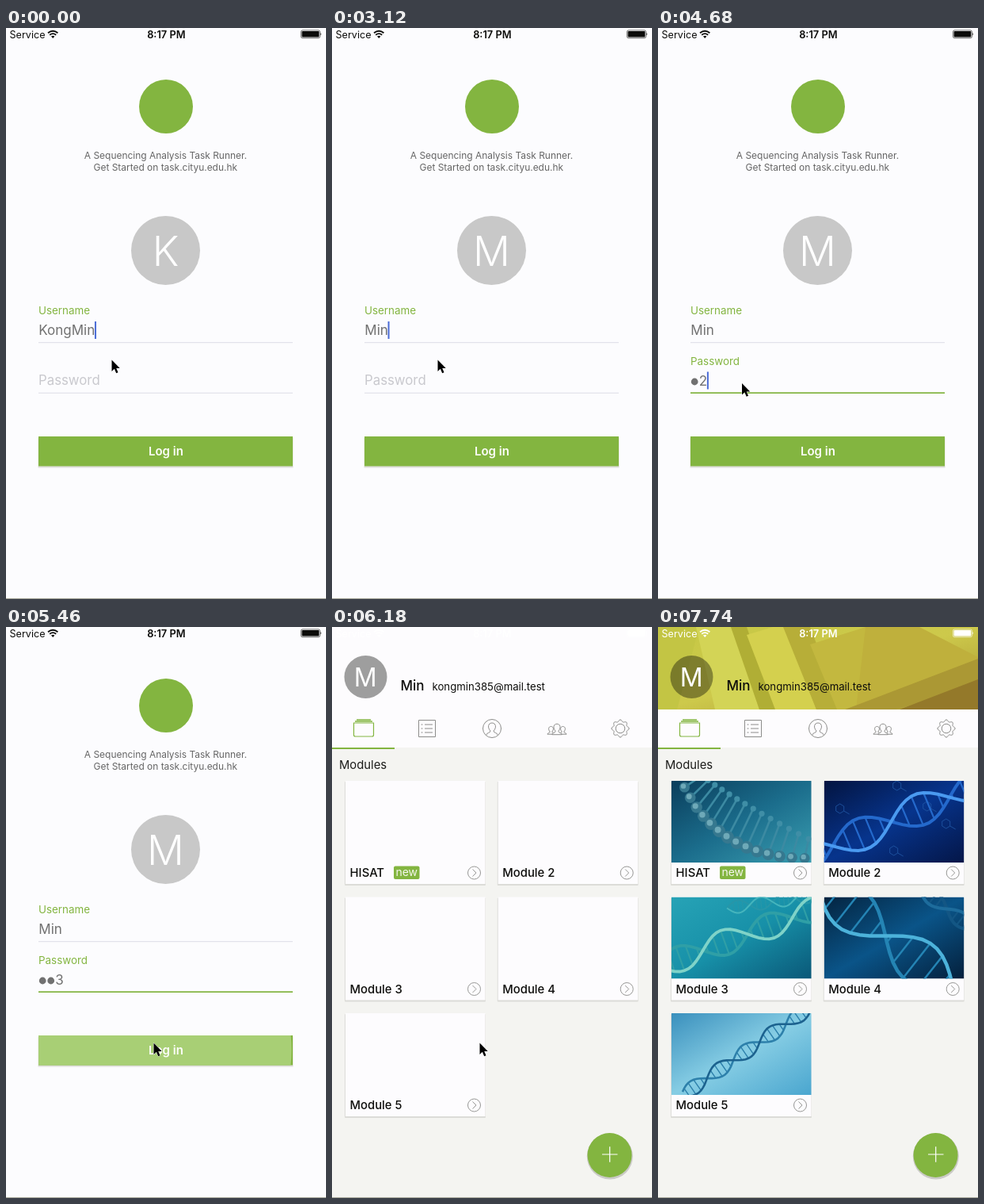
Write an HTML page that moves like this. It is 404 by 720 pixels and loops after 7.8 s.

```html
<!DOCTYPE html>
<html lang="en">
<head>
<meta charset="utf-8">
<title>Task runner login</title>
<style>
html, body { margin: 0; width: 100%; height: 100%; overflow: hidden; background: #fcfcfe; }
svg { display: block; }
#stage { width: 100%; height: 100%; }
text { font-family: Inter, Roboto, sans-serif; white-space: pre; }
</style>
</head>
<body>
<svg id="stage" viewBox="0 0 404 720"></svg>
<script>
const LOOP = 7800, STEP = 60;
const GREEN = [131, 181, 64], PALE = [201, 201, 206];
const rgb = c => `rgb(${c.map(Math.round)})`;
const clamp = v => Math.max(0, Math.min(1, v));
const span = (t, a, b) => clamp((t - a) / (b - a));
const ease = p => p * p * (3 - 2 * p);
const mix = (a, b, p) => a + (b - a) * p;
const mixColor = (a, b, p) => rgb(a.map((v, i) => mix(v, b[i], p)));
const green = rgb(GREEN), gray = '#8c8c8a', typed = '#717171';

// Markup helpers
const text = (x, y, font, fill, s, extra = '') =>
  `<text x="${x}" y="${y}" fill="${fill}" style="font:${font} Inter,Roboto,sans-serif" ${extra}>${s}</text>`;
const rect = (x, y, w, h, fill, extra = '') =>
  `<rect x="${x}" y="${y}" width="${w}" height="${h}" fill="${fill}" ${extra}/>`;
const disc = (x, y, r, fill, extra = '') =>
  `<circle cx="${x}" cy="${y}" r="${r}" fill="${fill}" ${extra}/>`;
const path = (d, color, width = 1, extra = '') =>
  `<path d="${d}" fill="none" stroke="${color}" stroke-width="${width}" ${extra}/>`;
const poly = (points, fill) => `<polygon points="${points}" fill="${fill}"/>`;
const mid = 'text-anchor="middle"';
const grad = (id, ...colors) =>
  `<linearGradient id="${id}" x1="0" y1="0" x2="1" y2="1">` +
  colors.map((c, i) => `<stop offset="${i / (colors.length - 1)}" stop-color="${c}"/>`).join('') +
  '</linearGradient>';

// Two twisted strands with rungs, along a straight axis
function helix(x1, y1, x2, y2, amp, turns, light, dark, width, shift = 0) {
  const len = Math.hypot(x2 - x1, y2 - y1), n = Math.round(turns * 20);
  const nx = -(y2 - y1) / len, ny = (x2 - x1) / len;
  const at = (i, side) => {
    const k = side * amp * Math.sin(i / 20 * Math.PI * 2 + shift), p = i / n;
    return `${(mix(x1, x2, p) + nx * k).toFixed(1)} ${(mix(y1, y2, p) + ny * k).toFixed(1)}`;
  };
  const a = [], b = [];
  let rungs = '';
  for (let i = 0; i <= n; i++) {
    a.push(at(i, 1));
    b.push(at(i, -1));
    if (i % 2) rungs += `M${at(i, 1)}L${at(i, -1)}`;
  }
  return path(rungs, dark, width * .55) + path('M' + b.join('L'), dark, width) +
    path('M' + a.join('L'), light, width);
}

// Beaded strands along two quadratic curves
function beads() {
  const q = (a, b, c, p) => a * (1 - p) ** 2 + 2 * b * p * (1 - p) + c * p * p;
  let rungs = '', balls = '';
  for (let i = 0; i <= 15; i++) {
    const p = i / 15, r = mix(6, 8, Math.sin(p * Math.PI));
    const x = q(10, 56, 185, p), y = q(-6, 104, 97, p);
    const u = q(30, 88, 186, p), v = q(-12, 30, 80, p);
    rungs += `M${x} ${y}L${u} ${v}`;
    balls += disc(u, v, 3.6, '#3f8ea6') + disc(x, y, r, '#36788f') + disc(x - 1.5, y - 1.5, r * .5, '#6ea9b8');
  }
  return path(rungs, '#3c8aa2', 2.6) + balls;
}

const hexagon = (x, y) => path(`M${x} ${y - 6}l5 3v6l-5 3l-5-3v-6zM${x + 5} ${y + 3}l7 4`, '#235aa8', .8);

const pictures = [
  beads(),
  [[92, 6], [130, 32], [20, 35], [154, 54], [88, 88]].map(p => hexagon(...p)).join('') +
    helix(-8, 90, 184, 10, 20, 1.3, '#4a9af0', '#2469cc', 4, -.8),
  helix(70, 14, 185, -2, 8, 2, '#45b5bd', '#2796a8', 2) +
    helix(-6, 84, 186, 14, 16, 1.7, '#7fd3c8', '#2f9fa6', 3.8, .6),
  helix(120, -12, 190, 42, 9, 1, '#1d6c9c', '#135684', 4) +
    helix(5, -8, 160, 114, 28, .9, '#4cb2da', '#2484b4', 4.5, .5),
  helix(16, 102, 182, -12, 9, 2.5, '#1c628f', '#2d80ab', 2.6, .4)
];

const cards = ['HISAT', 'Module 2', 'Module 3', 'Module 4', 'Module 5'];
function card(name, i) {
  const x = 17 + i % 2 * 192.7, y = 194 + Math.floor(i / 2) * 146.5;
  const badge = i ? '' : rect(x + 61, y + 107.5, 32.5, 16.5, green, 'rx="2"') +
    text(x + 77.2, y + 120, '14px', '#f6f8ee', 'new', mid);
  return rect(x - 1, y + 1, 178, 131, '#dcdcd8', 'rx="1"') +
    rect(x, y, 176.5, 130, '#fdfcfe') +
    `<svg class="photo" x="${x}" y="${y}" width="176.5" height="103" overflow="hidden">` +
    rect(0, 0, 177, 103, `url(#bg${i})`) + pictures[i] + '</svg>' +
    text(x + 5.6, y + 121, '500 14.8px', '#0d0d0b', name) + badge +
    disc(x + 162.5, y + 116, 8, 'none', `stroke="${gray}" stroke-width=".9"`) +
    path(`M${x + 160.5} ${y + 111.5}l4.5 4.5l-4.5 4.5`, gray, .9);
}

function gear(x, y) {
  let d = '';
  for (let i = 0; i < 64; i++) {
    const a = i / 32 * Math.PI, r = 9.9 + 1.2 * Math.cos(8 * a);
    d += `${i ? 'L' : 'M'}${(x + r * Math.cos(a)).toFixed(1)} ${(y + r * Math.sin(a)).toFixed(1)}`;
  }
  return path(d + 'Z', gray) + disc(x, y, 5.8, 'none', `stroke="${gray}"`);
}

const bust = (x, y, k) =>
  `M${x - 7 * k} ${y + 8 * k}c0-${3 * k} ${5 * k}-${2 * k} ${5 * k}-${5 * k}` +
  `c-${4 * k}-${4 * k}-${3 * k}-${10 * k} ${2 * k}-${10 * k}s${6 * k} ${6 * k} ${2 * k} ${10 * k}` +
  `c0 ${3 * k} ${5 * k} ${2 * k} ${5 * k} ${5 * k}`;

const icons =
  path('M27.5 121h25v15q0 2-2 2h-21q-2 0-2-2z', green, 1.2) +
  path('M29 119h22M31 117h18', green, 1.6) +
  path('M109.5 117.5h21v21h-21zM117 123h10M117 128h10M117 133h10M112.5 123h2M112.5 128h2M112.5 133h2', gray) +
  disc(202, 128, 11.5, 'none', `stroke="${gray}"`) + path(bust(202, 128, 1), gray) +
  path(bust(276.5, 130, .65) + 'z' + bust(291.5, 130, .65) + 'z', gray) +
  path(bust(284, 128.5, .9) + 'z', gray, 1, 'style="fill:#fdfcfe"') +
  gear(364, 128);

const banner = rect(0, 0, 404, 104, 'url(#gold)') +
  poly('0,0 52,0 24,104 0,104', '#c3c544') +
  poly('48,0 92,0 128,104 72,104', '#d3d456') +
  poly('92,0 112,0 148,104 128,104', '#b0ae35') +
  poly('112,10 158,-4 200,104 148,104', '#d4d04e') +
  poly('158,0 192,0 232,104 200,104', '#b7ae38') +
  poly('192,22 262,0 300,104 226,104', '#c3b83f') +
  poly('262,0 330,0 404,38 404,58 250,104', '#bfb03c') +
  poly('236,104 404,40 404,74 300,104', '#ab9834') +
  poly('305,104 404,66 404,104', '#94792a');

const field = (id, top) =>
  rect(41, top + 39.7, 321, 1, '#dcdce6') +
  `<g id="${id}Line">${rect(41, top + 39.3, 321, 1.7, green)}</g>` +
  text(41, 0, '13.4px', green, id === 'user' ? 'Username' : 'Password', `id="${id}Label"`) +
  text(41.3, top + 30.5, '17px', typed, '', `id="${id}Text"`);

const login =
  rect(0, 0, 404, 720, '#fcfcfe') +
  disc(202, 99, 34, green) +
  text(201.5, 165, '11.95px', '#666', 'A Sequencing Analysis Task Runner.', mid) +
  text(201.3, 179.5, '11.95px', '#666', 'Get Started on task.cityu.edu.hk', mid) +
  disc(201.5, 280.5, 43.5, '#c8c8c8') +
  text(201.5, 299.5, '300 52px', '#fff', '', `id="initial" ${mid}`) +
  field('user', 356.5) + field('pass', 420) +
  disc(46.2, 446, 4.4, typed, 'id="dot0"') + disc(56.7, 446, 4.4, typed, 'id="dot1"') +
  rect(0, 0, 2, 22, '#4a6bd6', 'id="caret"') +
  rect(40.5, 517, 322, 37.5, '#dededa') +
  `<svg x="41" y="515" width="321" height="37.5" overflow="hidden">` +
  rect(0, 0, 321, 38, green) + disc(145, 18, 0, '#a8cf75', 'id="ripple"') + '</svg>' +
  text(201.9, 539, '600 15px', '#fdfdfa', 'Log in', mid) +
  rect(0, 719, 404, 1, '#a9a99c');

const home =
  rect(0, 0, 404, 720, '#f4f4f1') + rect(0, 0, 404, 152, '#fdfcfe') +
  `<g id="banner">${banner}</g>` +
  disc(42.5, 63, 27, 'rgba(5,5,0,.38)') +
  text(42.3, 74.5, '32px', '#fff', 'M', mid) +
  text(86.5, 80, '500 17px', '#0d0d0b', 'Min') +
  text(126.5, 80, '13.2px', '#0d0d0b', 'kongmin385@mail.test') +
  icons + rect(0, 152, 79, 2, green) +
  text(9, 179, '14.8px', '#1c1c1a', 'Modules') +
  cards.map(card).join('') +
  disc(350.8, 667.5, 29, '#cacac6') + disc(350.5, 666, 28, green) +
  path('M341 665h19.5M350.7 655.3v19.5', '#fff', 1.2) +
  rect(0, 719, 404, 1, '#a9a99c');

const status = text(4.5, 12.5, '12.6px', 'inherit', 'Service', 'class="ink"') +
  text(202.3, 12.5, '600 12.8px', 'inherit', '8:17 PM', `class="ink" ${mid}`) +
  '<g fill="none" stroke="currentColor" stroke-width="1.8"><path d="M53 6.3q6.2-5.2 12.4 0M55.2 8.8q4-3.4 8 0"/></g>' +
  '<path d="M57 10.6q2.2-1.8 4.4 0l-2.2 2.4z" fill="currentColor"/>' +
  rect(372.4, 2.9, 24, 9.8, 'none', 'rx="2" stroke="currentColor" stroke-width=".6"') +
  rect(373.5, 4, 21.8, 7.6, 'currentColor', 'rx="1"') +
  '<path d="M397.4 6q1.6 1.8 0 3.6z" fill="currentColor"/>';

const stage = document.getElementById('stage');
stage.innerHTML = '<defs>' +
  grad('gold', '#c6c845', '#cdc94b', '#a5912f') +
  grad('bg0', '#0a3e5c', '#1b6d8c', '#3a9db0') +
  grad('bg1', '#031440', '#07348c', '#041648') +
  grad('bg2', '#27a3b6', '#1790a8', '#0a5878') +
  grad('bg3', '#042440', '#0a5488', '#04203c') +
  grad('bg4', '#3a90bd', '#86cde4', '#4aa6cf') + '</defs>' +
  `<g id="login">${login}</g><g id="home">${home}</g><g id="status">${status}</g>` +
  '<g id="mouse"><path d="M0 0v16l3.7-3.4l2.6 5.9l2.6-1.1l-2.5-5.8h5z" transform="scale(.9)" ' +
  'stroke="#fff" stroke-width="1" paint-order="stroke"/></g>';

const el = {};
stage.querySelectorAll('[id]').forEach(e => el[e.id] = e);
const photos = [...stage.querySelectorAll('.photo')];
const inks = stage.querySelectorAll('.ink');
const set = (e, attrs) => { for (const k in attrs) e.setAttribute(k, attrs[k]); };
const show = (e, on) => e.setAttribute('visibility', on ? 'visible' : 'hidden');

const erase = [420, 660, 900, 1140, 1380, 1620, 1860];
const retype = [2220, 2520, 2820];
const digits = [4260, 4560, 4860];
const passed = (times, t) => times.filter(v => t >= v).length;
// time, x, y of the pointer tip
const route = [[0, 133.5, 418.5], [3420, 133.5, 418.5], [3780, 106, 448], [4920, 106, 448],
  [5220, 186.5, 524.5], [6900, 186.5, 524.5], [7200, 420, 560], [LOOP, 420, 560]];

function floatLabel(label, p, y) {
  set(label, { y: y + mix(30, 4.7, p), fill: mixColor(PALE, GREEN, p) });
  label.style.fontSize = mix(16.8, 13.4, p) + 'px';
}

function drawLogin(t) {
  const name = t < 2220 ? 'KongMin'.slice(0, 7 - passed(erase, t)) : 'Min'.slice(0, passed(retype, t));
  el.userText.textContent = name;
  el.initial.textContent = name.charAt(0);
  floatLabel(el.userLabel, t < 2220 ? 1 - span(t, 1800, 1980) : span(t, 2160, 2340), 356.5);

  const count = passed(digits, t), shift = 10.5 * Math.max(0, count - 1);
  el.passText.textContent = count || '';
  set(el.passText, { x: 41.3 + shift });
  show(el.dot0, count > 1);
  show(el.dot1, count > 2);
  floatLabel(el.passLabel, span(t, 4200, 4380), 420);

  const onPass = t >= 3840, focus = ease(span(t, 3840, 4080));
  show(el.userLine, false);
  show(el.passLine, onPass);
  set(el.passLine, { transform: `translate(${201.5 * (1 - focus)} 0) scale(${focus} 1)` });

  const width = (onPass ? el.passText : el.userText).getComputedTextLength();
  set(el.caret, { x: 41 + (onPass ? shift : 0) + width, y: onPass ? 433.5 : 370 });
  show(el.caret, t < 5280);

  set(el.ripple, { r: 192 * span(t, 5260, 5480), opacity: t < 5260 ? 0 : 1 - span(t, 5470, 5590) });
}

function drawHome(t) {
  show(el.banner, t >= 6300);
  photos.forEach((p, i) => show(p, t >= 6360 + i * 60));
}

function draw(t) {
  const home = t >= 6060;
  el.login.style.display = home ? 'none' : '';
  el.home.style.display = home ? '' : 'none';
  if (home) drawHome(t); else drawLogin(t);

  const ink = mixColor([12, 12, 10], [255, 255, 255], span(t, 5700, 5820));
  el.status.style.color = ink;
  inks.forEach(e => e.setAttribute('fill', ink));

  const i = route.findIndex((r, k) => k && t <= r[0]);
  const [a, b] = [route[i - 1], route[i]], p = ease(span(t, a[0], b[0]));
  set(el.mouse, { transform: `translate(${mix(a[1], b[1], p)} ${mix(a[2], b[2], p)})` });
}

const start = performance.now();
function tick() {
  const t = (performance.now() - start) % LOOP;
  draw(Math.floor(t / STEP) * STEP);
  requestAnimationFrame(tick);
}
tick();
</script>
</body>
</html>
```
